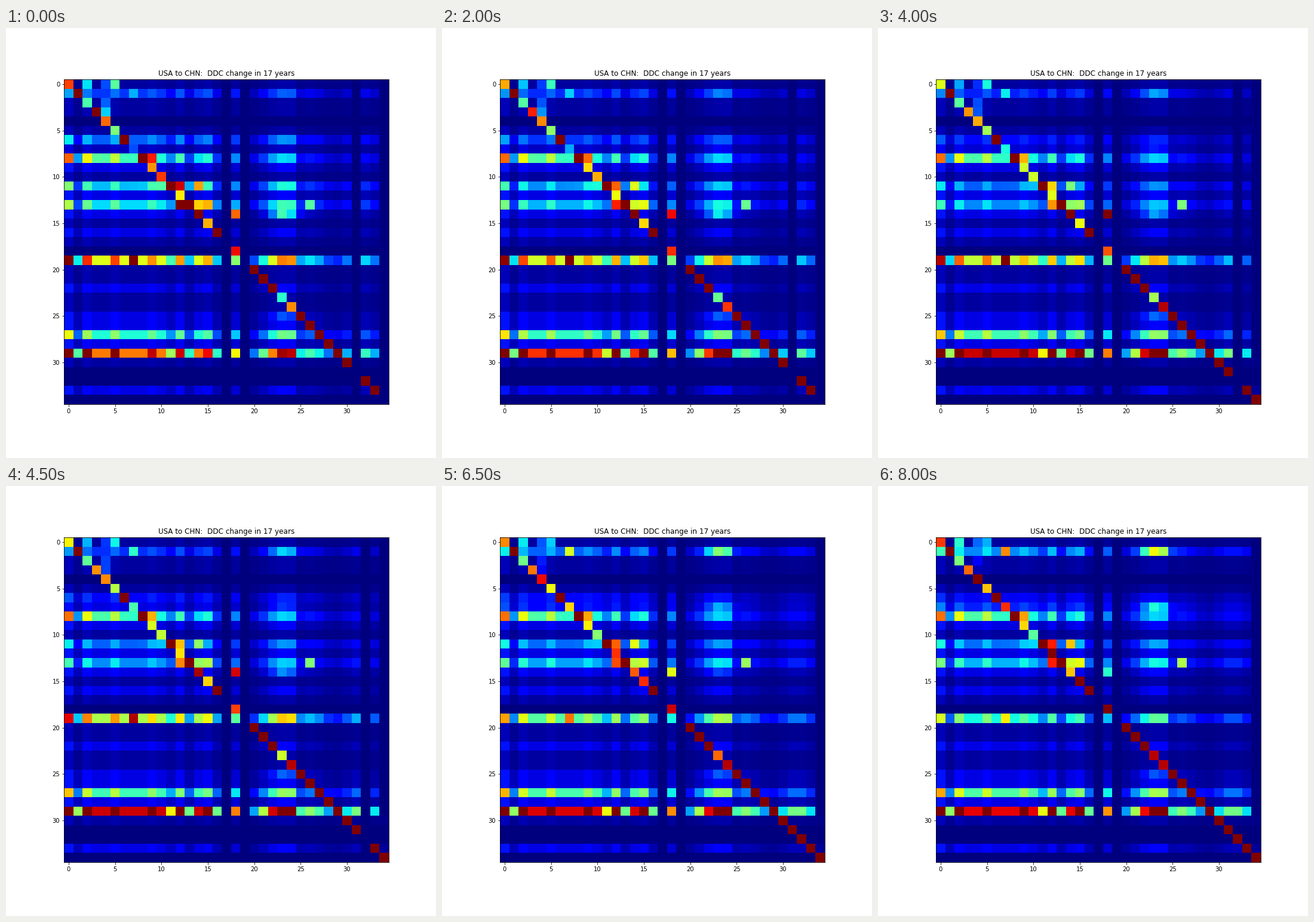
A matplotlib script for the animation above (8.5 s loop, 720 px wide and 720 px high).

```python
import numpy as np
import matplotlib.pyplot as plt
from matplotlib.animation import FuncAnimation

SIZE = 720
N = 35
FRAMES = 17
LAST = FRAMES - 1
COLS = np.arange(N)


def column_sizes():
    """Demand of each column: a plateau, a hump and a wavy tail."""
    size = np.full(N, .52)
    outliers = {0: .85, 1: .3, 2: .72, 5: .7, 9: .63, 11: .36, 12: .62,
                13: .27, 15: .6, 16: .27, 18: .43, 20: .16}
    for col, level in outliers.items():
        size[col] = level
    size[21:25] = .66 * np.exp(-((COLS[21:25] - 23.4) / 2.8) ** 2)
    size[25:] = .21 + .08 * np.cos(2 * np.pi * (COLS[25:] - 26) / 5.5)
    return size


SIZES = column_sizes()
HUMP = np.exp(-((COLS - 23.2) / 1.4) ** 2)

# Levels below are given for the first, middle and last year.
STRONG = {
    1: (.34, .3, .5), 6: (.42, .25, .2), 7: (.1, .14, .3),
    8: (.95, .93, .93), 11: (.6, .42, .45), 13: (.66, .5, .58),
    19: (1.2, 1.12, .72), 27: (.75, .82, .86), 29: (1.5, 1.8, 1.75),
}
MILD = [9, 12, 14, 16, 22, 25, 26, 28, 33]
BLANK = [4, 18, 31, 32, 34]

# Extra demand in the hump columns.
SURGE = {1: (0, .1, .33), 7: (0, .06, .2), 14: (.33, .18, .02),
         25: (.1, .12, .1)}

# Diagonal cells that do not saturate.
DIAGONAL = {
    0: (.84, .62, .85), 2: (.44, .46, .5), 3: (1, .75, .8),
    4: (.8, .73, 1), 5: (.5, .55, .7), 7: (.2, .38, .86),
    9: (.75, .6, .68), 10: (.85, .6, .46), 12: (.66, .62, 1),
    14: (1, 1, .7), 15: (.72, .64, 1), 18: (.9, .82, 1),
    23: (.4, .55, .95), 24: (.76, .95, .95),
}

# Close trading pairs.
PAIRS = {
    (0, 2): (.35, .29, .4), (0, 4): (.2, .17, .23), (0, 5): (.46, .38, .3),
    (1, 7): (.3, .36, .76), (2, 4): (.22, .2, .12), (3, 4): (.33, .21, .05),
    (8, 9): (.88, .72, .74), (11, 12): (.93, .68, .88),
    (11, 14): (.74, .5, .7), (13, 12): (1, .75, .88),
    (13, 26): (.45, .5, .56), (14, 18): (.8, 1, .4), (19, 7): (1, 1, .66),
}


def missing(year):
    """Columns without data in the given year."""
    cols = [17, 19]
    if year == 2:
        cols += [18, 20]
    if year < 5:
        cols += [31, 34]
    if 5 <= year < 13:
        cols.append(32)
    return cols


def reach(row):
    """How a row's supply spreads over the columns."""
    if row == 8:
        return np.exp(-COLS / 40)
    if row in (11, 13):
        return 1 + np.exp(-((COLS - row - 1) / 2.2) ** 2)
    return np.ones(N)


def matrix(year):
    def at(levels):
        return np.interp(year, [0, LAST / 2, LAST], levels)

    gain = np.full(N, .06)
    gain[MILD] = .17
    gain[BLANK] = 0
    for row, levels in STRONG.items():
        gain[row] = at(levels)

    m = np.outer(gain, SIZES)
    for row in STRONG:
        m[row] *= reach(row)
    for row, levels in SURGE.items():
        m[row] += at(levels) * HUMP
    for cell, levels in PAIRS.items():
        m[cell] = at(levels)
    np.fill_diagonal(m, 1)
    for i, levels in DIAGONAL.items():
        m[i, i] = at(levels)
    m[:, missing(year)] = 0
    m[:30, 34] = 0
    return np.clip(m, 0, 1)


plt.rcParams["font.family"] = "DejaVu Sans"
plt.rcParams["text.kerning_factor"] = 6
fig = plt.figure(figsize=(10, 10), dpi=SIZE / 10, facecolor="white")
ax = fig.add_axes([.135, .125, .755, .755])
image = ax.imshow(matrix(0), cmap="jet", vmin=0, vmax=1,
                  interpolation="nearest", aspect="auto")
ax.set_xticks(range(0, N, 5))
ax.set_yticks(range(0, N, 5))
ax.set_title("USA to CHN:  DDC change in 17 years", fontsize=12)


def update(year):
    image.set_data(matrix(year))
    return [image]


anim = FuncAnimation(fig, update, frames=FRAMES, interval=500,
                     repeat=True, repeat_delay=0)
plt.show()
```
